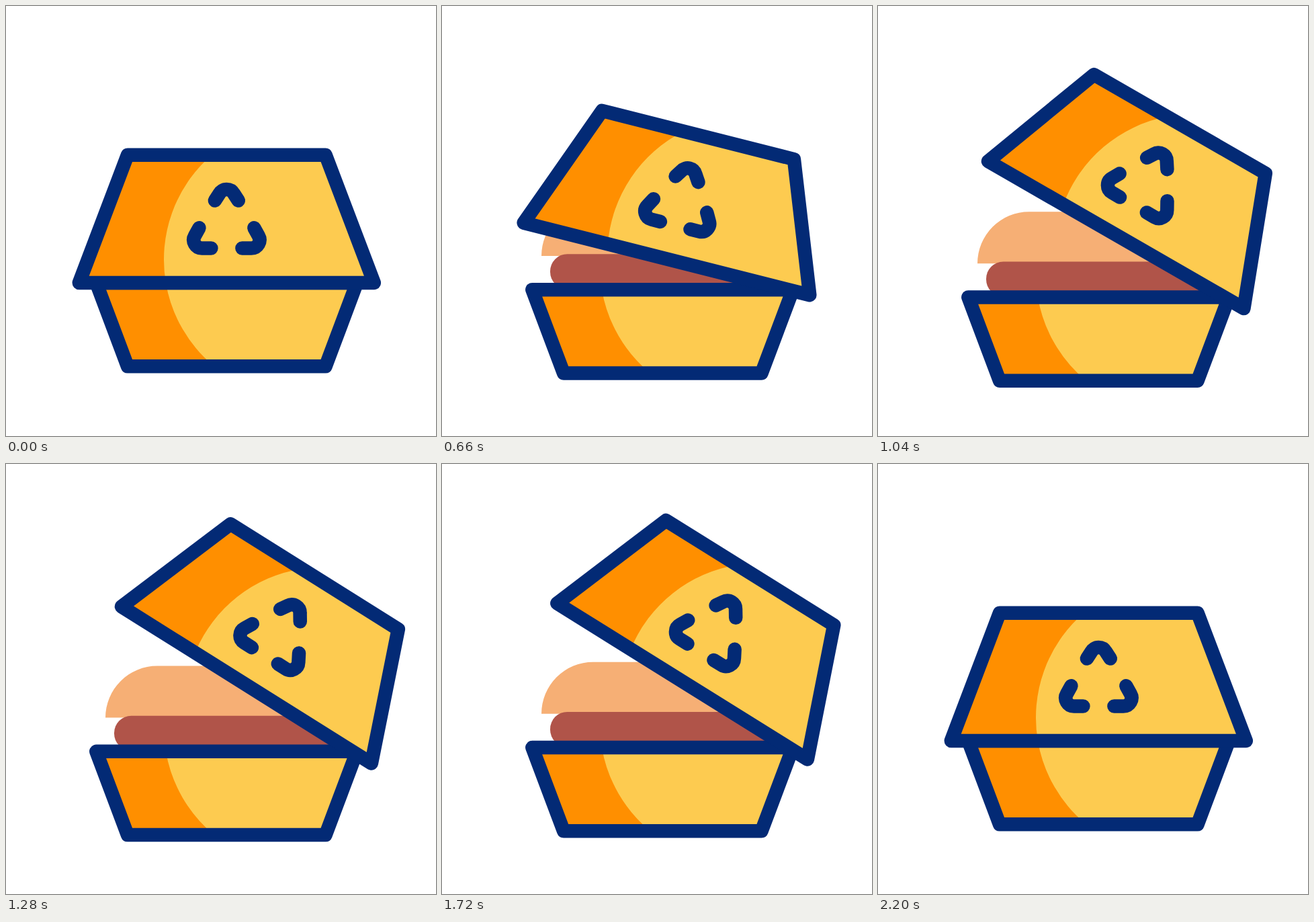
An HTML page for the animation above (2.4 s loop, 640 by 640 pixels).

```html
<!DOCTYPE html>
<html lang="en">
<head>
<meta charset="utf-8">
<title>Food box</title>
<style>
  html, body { margin: 0; width: 100%; height: 100%; overflow: hidden; background: #fff; }
  svg { display: block; width: 100vw; height: 100vh; }
  .line { fill: none; stroke: #032a75; }
  .line, .puff { stroke-width: 20.5; stroke-linecap: round; stroke-linejoin: round; }
  .puff { stroke: #fdcb50; }
  .light { fill: #fdcb50; }
  .shade { fill: #ff8f00; }
</style>
</head>
<body>
<svg viewBox="0 0 640 640">
  <g id="box">
    <path fill="#f6af75" d="M148 361.8A77 77 0 0 1 225 284.8H431A77 77 0 0 1 508 361.8Z"/>
    <rect fill="#b05449" x="161" y="359" width="335" height="52" rx="25.5"/>
    <path class="light" d="M134.3 412H522.3L475.6 536.3H181Z"/>
    <path class="shade" d="M134.3 412H237.9A206 206 0 0 0 309.8 536.3H181Z"/>
    <path class="line" d="M134.3 412H522.3L475.6 536.3H181Z"/>
    <g id="lid">
      <path class="light" d="M181 221.7H475.6L547.8 412H108.8Z"/>
      <path class="shade" d="M181 221.7H306.2A206 206 0 0 0 237.9 412H108.8Z"/>
      <path class="line" d="M181 221.7H475.6L547.8 412H108.8Z"/>
      <path class="line" d="M310.9 289.6L317.7 279.1A12.3 12.3 0 0 1 339 279.1L345.8 289.6
        M287.5 330.3L281 342A12.3 12.3 0 0 0 291.7 360.5H305.4
        M369.3 330.3L375.8 342A12.3 12.3 0 0 1 365.1 360.5H351.4"/>
    </g>
  </g>
  <line class="puff"/><line class="puff"/><line class="puff"/>
</svg>
<script>
const LOOP = 2400, PUFF_LENGTH = 40;
const box = document.getElementById('box');
const lid = document.getElementById('lid');
const puffs = document.querySelectorAll('.puff');

// Keys are [time, value] pairs.
const boxY = [[200, 0], [1200, 23], [1400, 3], [1600, 23], [1800, 3], [2000, 23], [2200, 0]];
const lidAngle = [[200, 0], [1200, 32.1], [1700, 32.1], [2200, 0]];
const puffTip = [[1860, 0], [2070, 1]];
const puffTail = [[1990, 0], [2200, 1]];

// Start point and direction of each puff.
const rays = [[73.8, 366.3, -.88, -.47], [77.8, 411.8, -1, 0], [73.8, 451.7, -.88, .47]];

function ease(keys, t) {
  if (t <= keys[0][0]) return keys[0][1];
  for (let i = 1; i < keys.length; i++) {
    const [t0, v0] = keys[i - 1], [t1, v1] = keys[i];
    if (t < t1) {
      const p = (t - t0) / (t1 - t0);
      return v0 + (v1 - v0) * p * p * (3 - 2 * p);
    }
  }
  return keys[keys.length - 1][1];
}

function draw(t) {
  box.setAttribute('transform', `translate(0 ${ease(boxY, t)})`);
  lid.setAttribute('transform', `rotate(${ease(lidAngle, t)} 515 414)`);
  const tip = ease(puffTip, t), tail = ease(puffTail, t);
  puffs.forEach((puff, i) => {
    const [x, y, dx, dy] = rays[i];
    const a = tail * PUFF_LENGTH, b = tip * PUFF_LENGTH;
    puff.setAttribute('x1', x + dx * a);
    puff.setAttribute('y1', y + dy * a);
    puff.setAttribute('x2', x + dx * b);
    puff.setAttribute('y2', y + dy * b);
    puff.style.display = tip > tail ? '' : 'none';
  });
}

const start = performance.now();
function tick() {
  draw((performance.now() - start) % LOOP);
  requestAnimationFrame(tick);
}
tick();
</script>
</body>
</html>
```
